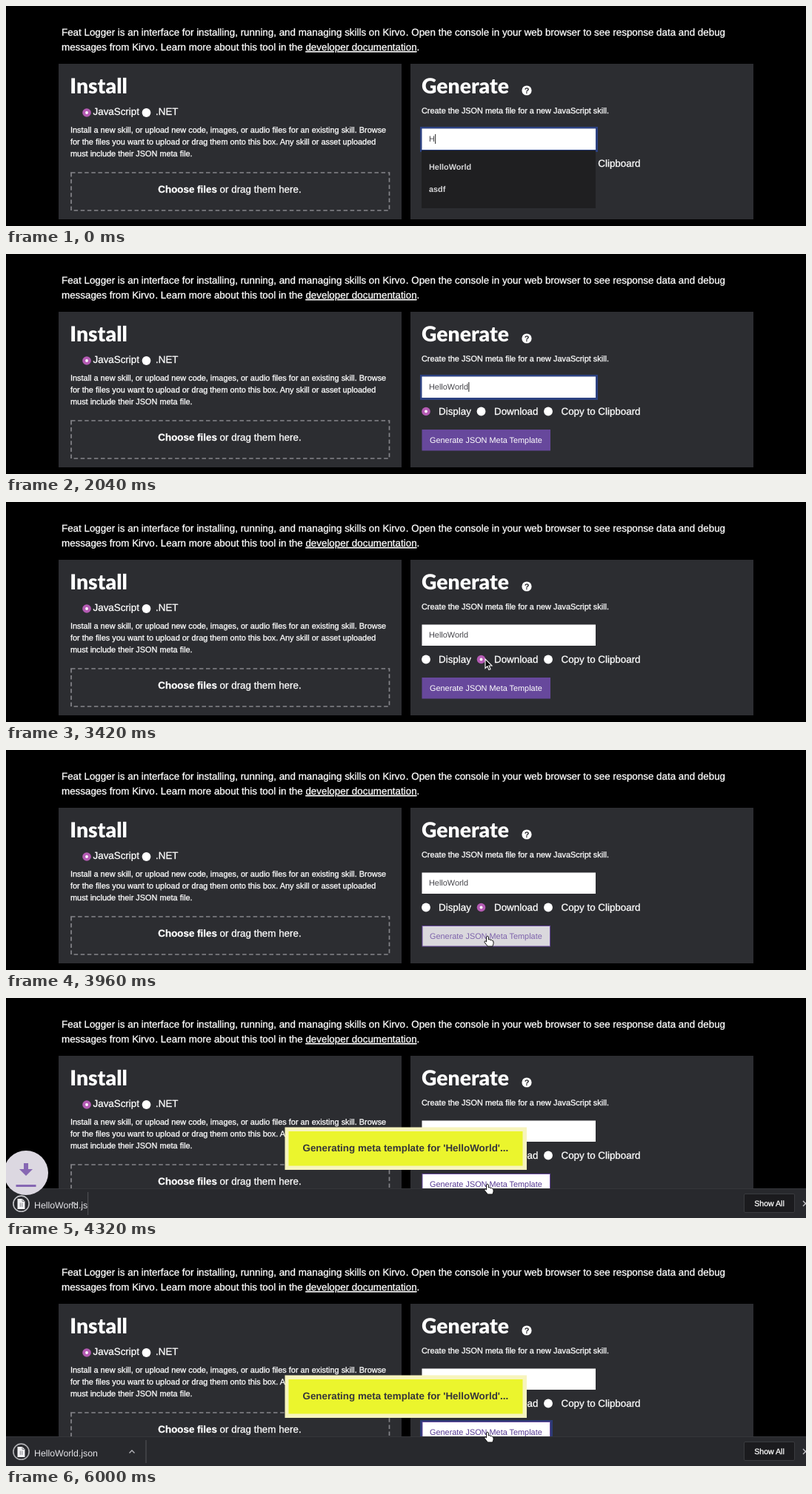
An HTML page for the animation above (6060 ms loop, 1080 by 297 pixels).

```html
<!DOCTYPE html>
<html lang="en">
<head>
<meta charset="utf-8">
<title>Skill installer</title>
<style>
  html, body { margin: 0; width: 100%; height: 100%; overflow: hidden; background: #000; }
  svg { display: block; width: 100vw; height: 100vh; }
  text { font-family: "Liberation Sans", Arial, sans-serif; fill: #fff; white-space: pre; text-rendering: geometricPrecision; }
  .lead { font-size: 13.38px; }
  .small { font-size: 10.9px; }
  .thick { stroke: #fff; stroke-width: .28px; }
  .head { font: 900 28.3px Lato, sans-serif; }
  .bold { font-weight: 700; }
  .panel { fill: #2c2d31; }
</style>
</head>
<body>
<svg viewBox="0 0 1080 297" xmlns="http://www.w3.org/2000/svg">
  <defs>
    <clipPath id="menuClip"><rect id="menuClipBox" x="561" y="195" width="235" height="78"/></clipPath>
    <clipPath id="itemClip"><rect id="itemClipBox" x="0" y="257" width="189" height="40"/></clipPath>
  </defs>
  <rect width="1080" height="297"/>

  <g class="lead thick">
    <text x="75" y="40">Feat Logger is an interface for installing, running, and managing skills on Kirvo<tspan x="539.8">. Open the console in your web browser to see response data and debug</tspan></text>
    <text x="75" y="60">messages from Kirvo<tspan x="201.4">. Learn more about this tool in the </tspan><tspan text-decoration="underline">developer documentation</tspan>.</text>
  </g>

  <rect class="panel" x="71" y="78" width="463" height="210"/>
  <text class="head" x="86.3" y="118">Install</text>
  <g id="langRadios"></g>
  <g class="lead thick">
    <text x="117.5" y="147">JavaScript</text>
    <text x="202" y="147">.NET</text>
  </g>
  <g class="small thick">
    <text x="87" y="171">Install a new skill, or upload new code, images, or audio files for an existing skill. Browse</text>
    <text x="87" y="187">for the files you want to upload or drag them onto this box. Any skill or asset uploaded</text>
    <text x="87" y="203">must include their JSON meta file.</text>
  </g>
  <rect x="88" y="225" width="429.5" height="51" fill="none" stroke="#85858a" stroke-width="1.7" stroke-dasharray="5.5 3.6"/>
  <text class="lead thick" x="302" y="252" text-anchor="middle"><tspan class="bold">Choose files</tspan> or drag them here.</text>

  <rect class="panel" x="546" y="78" width="463" height="210"/>
  <text class="head" x="561" y="118">Generate</text>
  <circle cx="703" cy="114" r="6.6" fill="#fff"/>
  <text class="bold" x="703" y="118" font-size="11" text-anchor="middle" style="fill:#222226">?</text>
  <text class="small thick" x="561" y="145">Create the JSON meta file for a new JavaScript skill.</text>

  <rect id="inputRing" x="560.5" y="164.5" width="237" height="31" fill="none" stroke="#2c4180" stroke-width="3"/>
  <rect x="561.5" y="165.5" width="234.5" height="28.5" fill="#fff"/>
  <text id="typed" class="small" x="571" y="183" style="fill:#45454a"></text>
  <rect id="caret" y="173" width="1" height="13" fill="#222"/>

  <g id="modeRadios"></g>
  <g class="lead thick">
    <text x="584" y="217">Display</text>
    <text x="659" y="217">Download</text>
    <text x="749.5" y="217">Copy to Clipboard</text>
  </g>
  <rect id="buttonRing" x="560.5" y="236.5" width="176" height="30" fill="none" stroke="#2c3a75" stroke-width="3"/>
  <rect id="button" x="562" y="237.5" width="172.5" height="27.5" stroke="#67489c"/>
  <text id="buttonText" class="small" x="572" y="255">Generate JSON Meta Template</text>

  <g id="menu" clip-path="url(#menuClip)">
    <rect x="561" y="195" width="235" height="78" fill="#1f1f21"/>
    <g class="small bold">
      <text x="571" y="221" style="fill:#d6d6d8">HelloWorld</text>
      <g id="otherItems">
        <text x="571" y="251" style="fill:#d6d6d8">asdf</text>
        <text x="571" y="281" style="fill:#d6d6d8">asdf1</text>
      </g>
    </g>
  </g>

  <g id="notice">
    <rect x="376.5" y="174.5" width="326.5" height="57.5" fill="#f7f4bd"/>
    <rect x="381.5" y="180" width="316" height="46.5" fill="#ebf52d"/>
    <text class="bold" x="400.5" y="207" font-size="13.4" style="fill:#36363a">Generating meta template for 'HelloWorld'...</text>
  </g>

  <g id="shelf">
    <rect y="257" width="1080" height="40" fill="#28292d"/>
    <path d="M0 257.5H1080" stroke="#35363a"/>
    <g clip-path="url(#itemClip)">
      <circle id="pulse" cx="20.5" cy="277.7" r="10.6" fill="none" stroke="#e8e8ec" stroke-width="1.6"/>
      <path d="M15.5 271H22L25.5 274.5V285H15.5Z" fill="#f2f2f4"/>
      <path d="M22 271V274.5H25.5M19.3 276.5V282M21.8 276.5V282" fill="none" stroke="#77777c" stroke-width=".9"/>
      <text x="38" y="283.5" font-size="12.3" style="fill:#e4e4e8">HelloWorld.json</text>
    </g>
    <path id="chevron" d="M-3.5 2L0 -1.5L3.5 2" fill="none" stroke="#b8b8bd" stroke-width="1.3"/>
    <path id="divider" d="M.5 262V293" stroke="#55565a"/>
    <rect x="996.5" y="264.5" width="68" height="25" rx="1.5" fill="#1b1b1e" stroke="#3a3b3f"/>
    <text class="thick" x="1030.5" y="280.5" font-size="10.6" text-anchor="middle">Show All</text>
    <path d="M1076 274L1083 281M1083 274L1076 281" stroke="#c4c4c8" stroke-width="1.3"/>
  </g>

  <g id="badge">
    <circle r="30" fill="#dcd8e1"/>
    <path d="M-3 -13H3V-5H9L0 4L-9 -5H-3ZM-13.5 16H13.5V19H-13.5Z" fill="#8667b3"/>
  </g>

  <g id="pointer">
    <path id="beam" d="M-3 -7Q0 -7 0 -5V5Q0 7 -3 7M3 -7Q0 -7 0 -5M0 5Q0 7 3 7" fill="none" stroke="#222"/>
    <path id="arrow" d="M0 0V12.5L2.9 9.8L4.9 14.6L7 13.7L5 9H9Z" fill="#000" stroke="#fff" stroke-width="1.1"/>
    <path id="hand" d="M-1.4 8V1Q0 -1 1.4 1V5Q3 4 4 5.5Q5.6 4.8 6.2 6.3Q8 6 8 8V10.5Q7.6 12 6.8 14H.3Q-1.5 11.5 -4 8.6Q-4.4 6.6 -2.4 7.1Z" fill="#fff" stroke="#111" stroke-width="1"/>
  </g>
</svg>
<script>
const LOOP = 6060, STEP = 60;
const WORD = "HelloWorld";
const KEYS = [0, 120, 240, 300, 420, 660, 720, 780, 900, 960];
const BLUR = 3240, PICK = 3300, HOVER = 3630, SENT = 4020;
const PATH = [[2700, 655, 179], [3060, 647, 212], [3440, 647, 212], [3680, 650, 251]];

const $ = id => document.getElementById(id);
const set = (id, attrs) => {
  for (const k in attrs) $(id).setAttribute(k, attrs[k]);
};
const show = (id, on) => { $(id).style.display = on ? "" : "none"; };
const part = (t, from, length) => Math.min(1, Math.max(0, (t - from) / length));

const radio = (x, y, on) => on
  ? `<circle cx="${x}" cy="${y}" r="5.8" fill="#b45bb3"/><circle cx="${x}" cy="${y}" r="1.9" fill="#fff"/>`
  : `<circle cx="${x}" cy="${y}" r="5.9" fill="#fff"/>`;

function pointerAt(t) {
  let [, x, y] = PATH[0];
  for (let i = 1; i < PATH.length; i++) {
    const [t0, x0, y0] = PATH[i - 1], [t1, x1, y1] = PATH[i];
    if (t < t0) break;
    const p = part(t, t0, t1 - t0), e = p * p * (3 - 2 * p);
    x = x0 + (x1 - x0) * e;
    y = y0 + (y1 - y0) * e;
  }
  return [x, y];
}

function drawForm(t) {
  const count = KEYS.filter(k => k <= t).length;
  const focused = t < BLUR;
  $("typed").textContent = t < SENT ? WORD.slice(0, count) : "";
  show("inputRing", focused);
  const idle = t - KEYS[count - 1];
  show("caret", focused && idle % 1000 < 500);
  set("caret", { x: 571.3 + $("typed").getComputedTextLength() });

  show("menu", count < WORD.length);
  show("otherItems", count < 2);
  set("menuClipBox", { height: count < 2 ? 78 : 45 });

  const chosen = t < PICK ? 0 : 1;
  $("modeRadios").innerHTML = [567, 641.5, 732].map((x, i) => radio(x, 212.5, i === chosen)).join("");

  const sent = t >= SENT, hover = t >= HOVER;
  set("button", { fill: sent ? "#fff" : hover ? "#dad8dd" : "#67489c" });
  $("buttonText").style.fill = sent ? "#563a92" : hover ? "#7d62ab" : "#fff";
  show("buttonRing", t >= 4620);
}

function drawDownload(t) {
  set("notice", { opacity: part(t, SENT, 180) });

  show("shelf", t >= SENT);
  set("shelf", { transform: `translate(0 ${40 * (1 - part(t, SENT, 120))})` });
  const width = 189 * (1 - (1 - part(t, 4035, 800)) ** 2);
  set("itemClipBox", { width });
  set("chevron", { transform: `translate(${width - 19} 277.5)` });
  set("divider", { transform: `translate(${width - .5} 0)` });
  const phase = Math.max(0, t - 4180) / 1000 * 2 * Math.PI;
  set("pulse", { opacity: (Math.cos(phase) + 1) / 2 });

  // The badge sinks by its own height, fading in and out.
  const p = part(t, SENT, 600);
  set("badge", {
    transform: `translate(27 ${206 + 60 * p})`,
    opacity: 1 - 4 * (p - .5) ** 2
  });
}

function drawPointer(t) {
  const [x, y] = pointerAt(t);
  show("pointer", t >= PATH[0][0]);
  set("pointer", { transform: `translate(${x} ${y})` });
  show("beam", y < 194);
  show("arrow", y >= 194 && t < HOVER);
  show("hand", t >= HOVER);
}

function draw(t) {
  drawForm(t);
  drawDownload(t);
  drawPointer(t);
}

$("langRadios").innerHTML = radio(109, 144, true) + radio(189.5, 144, false);
const start = performance.now();
function tick() {
  const t = (performance.now() - start) % LOOP;
  draw(Math.floor(t / STEP) * STEP);
  requestAnimationFrame(tick);
}
draw(0);
requestAnimationFrame(tick);
</script>
</body>
</html>
```
